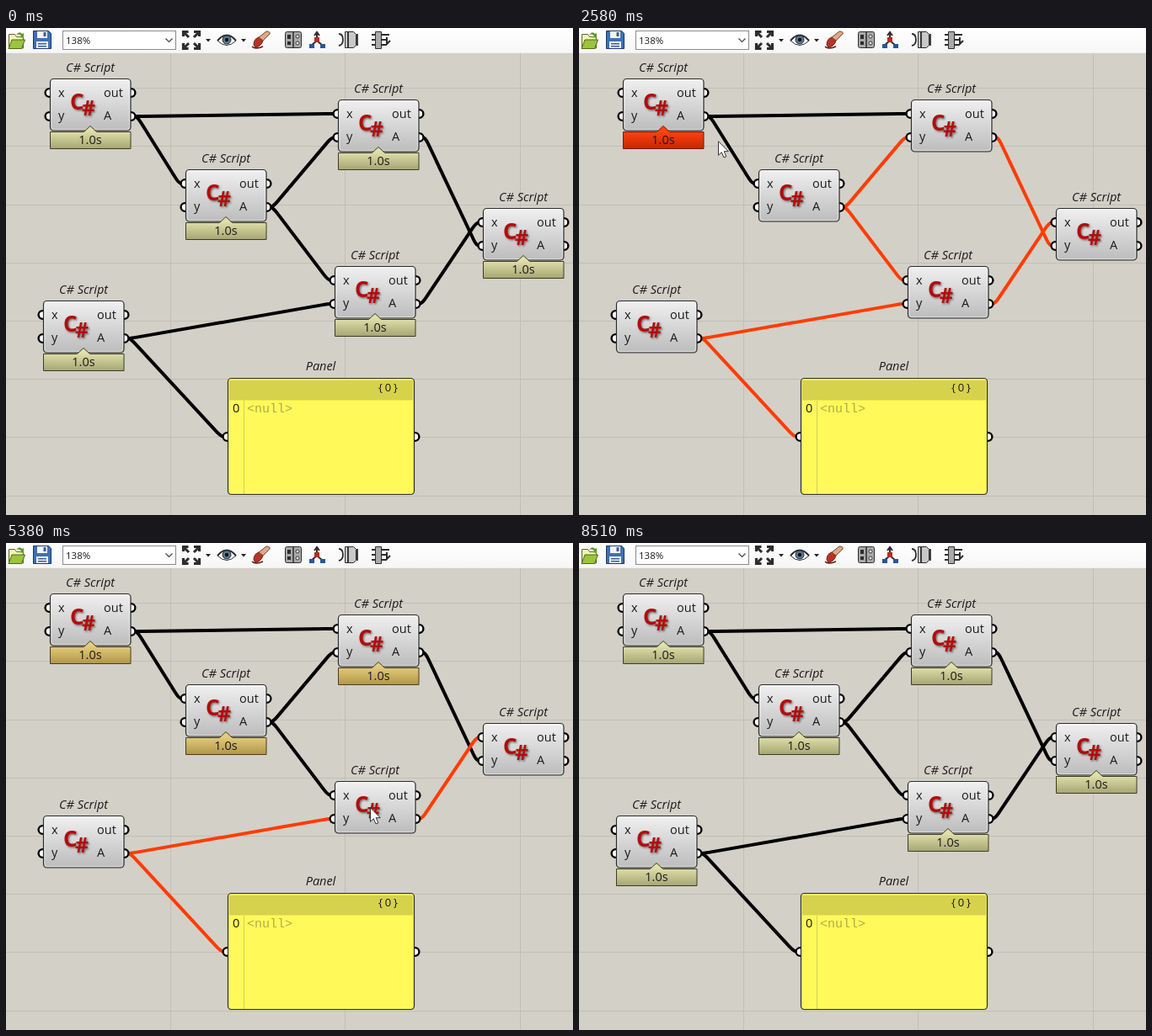
Recreate the animation shown at these times as an HTML page. Size 673 px wide and 579 px high, loop 8.91 s.

```html
<!DOCTYPE html>
<html lang="en">
<head>
<meta charset="utf-8">
<title>Node graph recompute</title>
<style>
html, body { margin: 0; width: 100%; height: 100%; overflow: hidden; background: #d3d0c8; }
svg { display: block; width: 673px; height: 579px; }
text { font: 14.5px "Open Sans", "Noto Sans", sans-serif; fill: #1a1a1a; }
.title { font-style: italic; text-anchor: middle; }
.mid { text-anchor: middle; }
.mono { font-family: "Liberation Mono", "DejaVu Sans Mono", monospace; font-size: 15px; fill: #b0aa4c; }
.path { font-size: 13px; letter-spacing: 2.8px; }
.lang { font-weight: 700; fill: #b20e0e; }
.grip { fill: #fff; stroke: #000; stroke-width: 2.4; }
.wire { fill: none; stroke-width: 4; stroke-linejoin: round; }
.small { font-size: 11.5px; }
</style>
</head>
<body>
<svg id="stage" viewBox="0 0 673 579" xmlns="http://www.w3.org/2000/svg">
  <defs id="defs">
    <linearGradient id="body" x2="0" y2="1">
      <stop stop-color="#f0f0f0"/><stop offset="1" stop-color="#bcbcbc"/>
    </linearGradient>
    <linearGradient id="bar" x2="0" y2="1">
      <stop stop-color="#fff"/><stop offset="1" stop-color="#f6f6f6"/>
    </linearGradient>
    <linearGradient id="haze" x2="1" y2="1">
      <stop stop-color="#e8e397"/><stop offset=".4" stop-color="#eee87c"/>
      <stop offset=".85" stop-color="#fffa5a" stop-opacity="0"/>
    </linearGradient>
    <clipPath id="below"><rect y="465" width="673" height="114"/></clipPath>
    <filter id="soft" x="-30%" y="-30%" width="170%" height="170%">
      <feDropShadow dx="1.2" dy="1.4" stdDeviation="1.1" flood-color="#000" flood-opacity=".5"/>
    </filter>
  </defs>
</svg>
<script>
const LOOP = 8910, RESET = 810;
const svg = document.getElementById('stage');
const defs = document.getElementById('defs');

// x, y, time of completion
const nodes = [
  [52, 61, 1880], [213, 169, 3200], [394, 86, 4290],
  [390, 284, 6110], [44, 325, 6110], [566, 215, 7270]
].map(([x, y, done]) => ({ x, y, done }));

// source node, target node (-1 is the panel), input row
const links = [[0, 2, 0], [0, 1, 0], [1, 2, 1], [1, 3, 0], [2, 5, 1], [3, 5, 0], [4, 3, 1], [4, -1, 0]];

const heat = {
  red: ['#ff4410', '#c82600', '#7a1400'],
  amber: ['#f4a850', '#c47620', '#5e3a0c'],
  gold: ['#e4cd7e', '#b2964a', '#4a3d18'],
  olive: ['#e1e1ac', '#a6a674', '#3c3c22']
};

function add(markup, parent = svg) {
  const g = document.createElementNS('http://www.w3.org/2000/svg', 'g');
  g.innerHTML = markup;
  return parent.appendChild(g);
}
const show = (el, on) => el.setAttribute('visibility', on ? 'visible' : 'hidden');
const grip = (x, y) => `<circle class="grip" cx="${x}" cy="${y}" r="4.9"/>`;
const line = (d, color, w = 1) => `<path d="${d}" fill="none" stroke="${color}" stroke-width="${w}"/>`;
const shape = (d, fill, edge = 'none') => `<path d="${d}" fill="${fill}" stroke="${edge}"/>`;

// straight run with softly bent ends
function wirePath(ax, ay, bx, by) {
  const p = ax + 3.5, q = bx - 3.5, len = Math.hypot(q - p, by - ay);
  const ux = (q - p) / len * 8, uy = (by - ay) / len * 8;
  return `M${ax},${ay}Q${p},${ay} ${p + ux},${ay + uy}L${q - ux},${by - uy}Q${q},${by} ${bx},${by}`;
}

for (const [name, [top, bottom]] of Object.entries(heat)) {
  add(`<linearGradient id="${name}" x2="0" y2="1"><stop offset=".2" stop-color="${top}"/>
    <stop offset="1" stop-color="${bottom}"/></linearGradient>`, defs);
}

function drawGrid() {
  let d = '';
  for (let i = 0; i < 3; i++) d += `M${195.5 + Math.round(i * 207.3)},30V579`;
  for (let i = 0; i < 8; i++) d += `M0,${Math.floor(71.7 + i * 69.2) + .5}H673`;
  add(`<rect width="673" height="579" fill="#d3d0c8"/>` + line(d, '#c1beb6'));
}

function drawToolbar() {
  const dark = '#2d2d2d';
  const drop = x => shape(`M${x - 3},13h6l-3,3.5z`, '#222');
  add(`<rect width="673" height="30" fill="url(#bar)"/>` +
    // folder and disk
    shape('M3.5,24V7.5h7l2,3h8V24z', '#f4f1bb', '#5d6b28') +
    shape('M3,24.5L7,14h15.5l-4,10.5z', '#9cc43c', '#4c6a16') +
    shape('M12,8q4,-5 7,-1l2,-1v6l-5,-1l2,-1.5q-2,-3 -6,-1.5z', '#5f9b24') +
    shape('M32.5,3.5h18l3,3V24.5h-21z', '#3f70b4', '#18386c') +
    shape('M37,4h12v8h-12zM36,16h14v8h-14z', '#f1f5fa') +
    shape('M44.5,5h3v5h-3zM38,18h10v1.5h-10zM38,21h10v1.5h-10z', '#3b5f92') +
    // zoom box
    `<rect x="67.5" y="3.5" width="134" height="22" fill="#fff" stroke="#8a8a8a"/>
     <text class="small" x="71" y="18.5">138%</text>` +
    line('M189.5,12.5l4,4l4,-4', '#444', 1.2) +
    // zoom extents
    line('M210.5,10V4.5h6M223,4.5h6.5V10M229.5,18v6.5H223M216.500,24.500h-6V18', dark, 3.2) +
    line('M211,5l6,6M229,5l-6,6M229,24l-6,-6M211,24l6,-6', dark, 3) +
    drop(240) +
    // eye
    shape('M251,15q11,-13 22,0q-11,11 -22,0z', '#fff', dark) +
    line('M251,15q11,-13 22,0', dark, 2) +
    `<circle cx="262" cy="14" r="5" fill="#5b7893" stroke="#23323f"/><circle cx="262" cy="14" r="2.2" fill="#111"/>` +
    drop(282) +
    // brush
    shape('M294,20q0,-7 6,-9l5,4q-2,7 -9,8z', '#b93226', '#742015') +
    shape('M300,11l9,-7q5,0 4,3l-8,8z', '#dda98a', '#75452a') +
    line('M292,22q4,4 13,0', '#561d16', 1.5) +
    // panel, tree, component, arrows
    `<rect x="331.5" y="4.5" width="19" height="19" rx="2" fill="#a9a9a9" stroke="${dark}"/>` +
    line('M341,5V23', dark, 1.5) + shape('M334,8h4v5h-4zM334,16h4v4h-4z', dark) +
    `<circle cx="346" cy="10" r="2" fill="#fff" stroke="#333"/><circle cx="346" cy="18" r="2" fill="#fff" stroke="#333"/>` +
    line('M369,6V15L362,21M369,15L376,21M366,9l3,-4l3,4', dark, 2) +
    shape('M366,11h6v6h-6z', '#b72a20') + shape('M360,19h6v5h-6zM373,19h6v5h-6z', '#27569b') +
    shape('M402.5,4.5h10l3,3v13l-3,3h-10z', '#c8c8c8', dark) +
    line('M395,7q5,0 5,7q0,6 -5,7M417,7v14M406,5v18', dark, 1.8) +
    shape('M438.5,4.5h7v20h-7z', '#aaa', dark) +
    line('M434,8h5M434,14h5M434,20h5M446,8h9M446,14h6M446,20h5M452,11v8l4,-4', dark, 2) +
    line('M0,29.5H673', '#efefed'));
}

function drawNode({ x, y }) {
  const left = x - .5, right = x + 96.5;
  add(grip(left, y + 16) + grip(left, y + 44) + grip(right, y + 16) + grip(right, y + 44) +
    `<rect x="${x + .5}" y="${y - .5}" width="95.5" height="61.5" rx="4" fill="url(#body)" stroke="#2c2c2c" stroke-width="1.2"/>
     <rect x="${x + 2}" y="${y + 1}" width="92.5" height="58.5" rx="3" fill="none" stroke="#fff" stroke-opacity=".45"/>
     <text class="title" x="${x + 48}" y="${y - 9.5}">C# Script</text>
     <text x="${x + 10}" y="${y + 21}">x</text><text x="${x + 10}" y="${y + 48}">y</text>
     <text x="${x + 64}" y="${y + 21}">out</text><text x="${x + 64}" y="${y + 48}">A</text>
     <g filter="url(#soft)"><text class="lang" style="font-size:26px" x="${x + 24}" y="${y + 36}">C</text>
     <text class="lang" style="font-size:25px" x="${x + 38}" y="${y + 42.5}">#</text></g>`);
}

function drawTimer({ x, y }) {
  const g = add(`<path d="M${x + .5},${y + 62.5}h40l7.5,-7l7.5,7h40.5v20h-95.5z"/>
    <text class="mid" x="${x + 48}" y="${y + 77}">1.0s</text>`);
  return { g, path: g.querySelector('path') };
}

function drawPanel() {
  add(grip(262.5, 486) + grip(485.5, 486) +
    `<rect x="263.5" y="416.5" width="221" height="138" rx="4" fill="#fffa5a" stroke="#2c2c2c" stroke-width="1.2"/>
     <rect x="265" y="419" width="218" height="23.5" fill="#d6d24c"/>` +
    line('M282.5,443V554', '#d3ce58') +
    `<text class="title" x="373.5" y="407">Panel</text>
     <text class="path" x="442" y="432">{0}</text>
     <text x="269" y="457">0</text>
     <text class="mono" x="286" y="457">&lt;null&gt;</text>`);
}

function tip(x, y, w, from, to, head, body) {
  const g = add(`<rect x="${x + .5}" y="${y + .5}" width="${w - 1}" height="85" fill="#fafafa" stroke="#555"/>
    <rect x="${x + 1}" y="${y + 1}" width="${w - 2}" height="27" fill="#e0e0e0"/>
    <text x="${x + 10}" y="${y + 19}" style="font-size:13px;font-weight:700">${head}</text>
    <text class="small" x="${x + 10}" y="${y + 48}">${body[0]}</text>
    <text class="small" x="${x + 10}" y="${y + 66}">${body[1]}</text>`);
  return { g, from, to };
}

drawGrid();
drawToolbar();
const wires = links.map(([a, b, row]) => {
  const s = nodes[a], e = nodes[b];
  const end = e ? [e.x - 4, e.y + 16 + row * 28] : [259, 486];
  const g = add(`<path class="wire" d="${wirePath(s.x + 100, s.y + 44, ...end)}"/>`);
  return { path: g.firstChild, source: s };
});
const panelWire = wires.at(-1).path.getAttribute('d');
const haze = add(`<path class="wire" d="${panelWire}" stroke="#4c4a46" clip-path="url(#below)"/>`);
nodes.forEach(drawNode);
const timers = nodes.map(drawTimer);
drawPanel();
const hazeFill = add(`<rect x="264.5" y="466" width="218" height="87" fill="url(#haze)"/>` + line('M282.5,466V554', '#cbc674'));
const script = ['C# Script', ['A C#.NET scriptable', 'component']];
const tips = [
  tip(316, 222, 300, 4090, 4290, 'out', ['Print, Reflect and Error streams', 'No data was collected']),
  tip(472, 159, 182, 4830, 5030, ...script),
  tip(462, 343, 182, 5710, 6110, ...script)
];
const click = add('<circle cx="310" cy="404" r="12" fill="#e9df4b"/>');
const cursor = add('<path d="M.5,.8V17.3L4.3,13.7L7,20L9.8,18.8L7.2,12.7H12.3z" fill="#fff" stroke="#222" stroke-width=".9"/>');

// start, end, steps, target
const moves = [
  [1880, 2580, 11, 165, 134], [3200, 3760, 9, 286, 193], [4290, 4500, 4, 442, 130],
  [5030, 5380, 6, 432, 314], [6110, 6530, 7, 116, 376], [6860, 7070, 4, 504, 316],
  [7270, 7410, 3, 615, 239], [7820, 8510, 10, 662, 592]
];
const stepAt = (t, from, to, n) => Math.min(n, Math.floor((t - from) / (to - from) * (n - 1) + 1e-6) + 1);
const ease = p => p * p * (3 - 2 * p);

function cursorAt(t) {
  const p = ease((stepAt(t, 70, 480, 7) - 1) / 6), q = 1 - p;
  let x = q * q * 495 + 2 * p * q * 400 + p * p * 310;
  let y = q * q * 504 + 2 * p * q * 200 + p * p * 404;
  for (const [from, to, n, tx, ty] of moves) {
    if (t < from) break;
    const k = ease(stepAt(t, from, to, n) / n);
    x += (tx - x) * k;
    y += (ty - y) * k;
  }
  return [x, y];
}

function render(t) {
  const idle = t < RESET;
  const count = nodes.filter(n => t >= n.done).length;
  const tone = idle ? 'olive' : ['olive', 'red', 'amber', 'gold'][count] || 'olive';

  nodes.forEach((n, i) => {
    const { g, path } = timers[i];
    show(g, idle || t >= n.done);
    path.setAttribute('fill', `url(#${tone})`);
    path.setAttribute('stroke', heat[tone][2]);
  });
  for (const { path, source } of wires) {
    path.setAttribute('stroke', idle || t >= source.done ? '#000' : '#ff3c00');
  }
  for (const { g, from, to } of tips) show(g, t >= from && t < to);

  const fade = t < 1350 ? 1 : .45;
  for (const g of [haze, hazeFill]) {
    show(g, t >= 1140 && t < 1420);
    g.setAttribute('opacity', fade);
  }
  show(click, t >= 740 && t < 1420);
  click.setAttribute('opacity', fade * .75);

  const [x, y] = cursorAt(Math.max(t, 70));
  show(cursor, t >= 70 && t < 8510);
  cursor.setAttribute('transform', `translate(${x.toFixed(1)} ${y.toFixed(1)})`);
}

const start = performance.now();
function tick() {
  render((performance.now() - start) % LOOP);
  requestAnimationFrame(tick);
}
tick();
</script>
</body>
</html>
```
